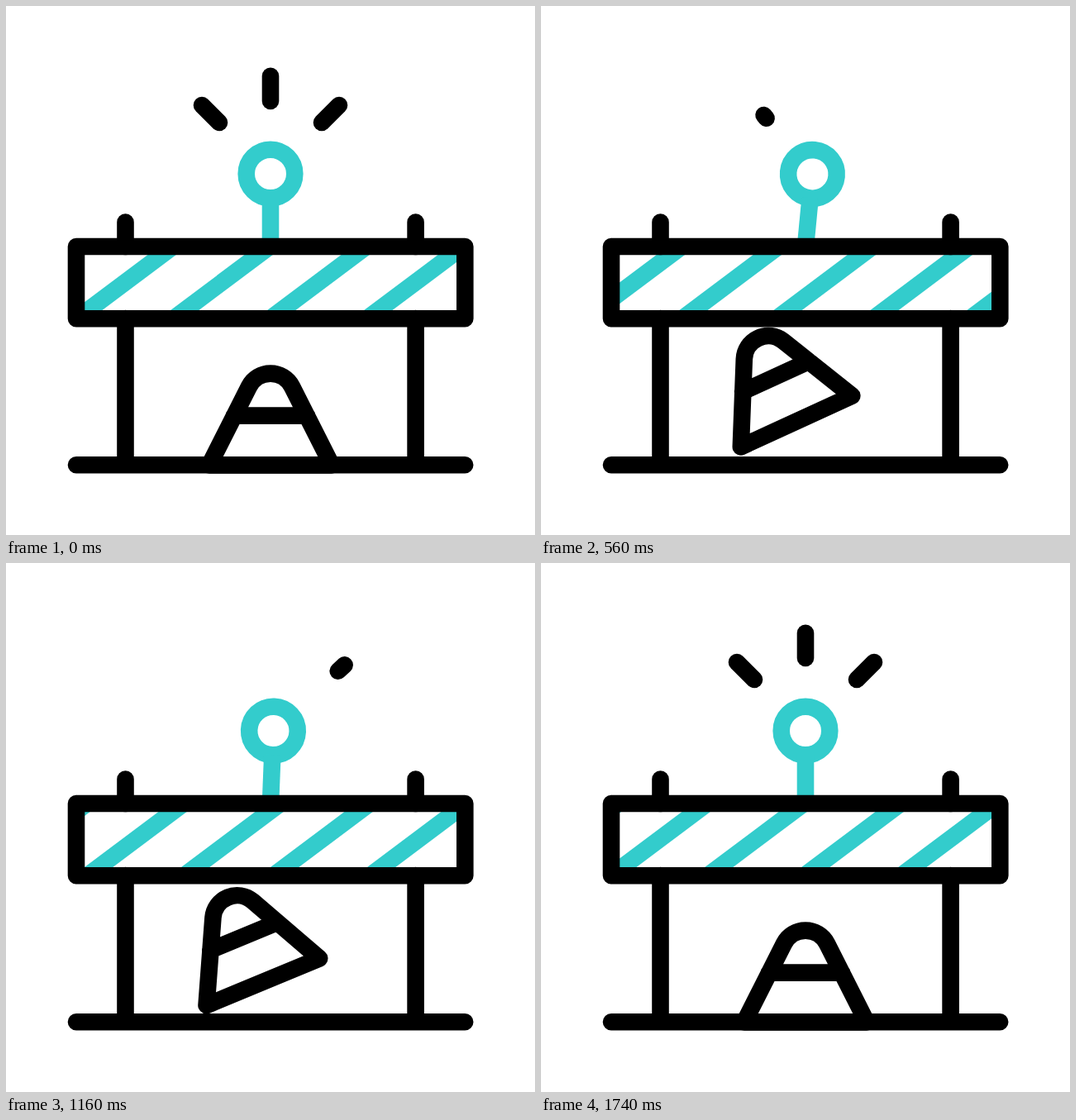
An HTML page for the animation above (2.04 s loop, 640 by 640 pixels).

```html
<!DOCTYPE html>
<html lang="en">
<head>
<meta charset="utf-8">
<title>Road barrier</title>
<style>
  html, body { margin: 0; width: 100%; height: 100%; overflow: hidden; background: #fff; }
  svg { display: block; width: 100vw; height: 100vh; }
  .ink, .teal { fill: none; stroke: #000; stroke-width: 20.6; stroke-linecap: round; stroke-linejoin: round; }
  .teal { stroke: #3cc; stroke-linecap: butt; }
</style>
</head>
<body>
<svg viewBox="0 0 640 640">
  <clipPath id="board"><rect x="85" y="291" width="470" height="87"/></clipPath>
  <g id="lamp">
    <g class="teal">
      <circle cx="320" cy="203" r="29.3"/>
      <path d="M320 232V291"/>
    </g>
    <g id="rays" class="ink"></g>
  </g>
  <g clip-path="url(#board)"><g id="stripes" class="teal"></g></g>
  <g class="ink">
    <rect x="85" y="291" width="470.3" height="87.3"/>
    <path d="M144.5 261.5V291M495.6 261.5V291M144.5 378V555M495.6 378V555M85 555.2H555.2"/>
    <path id="cone" d="M246 555.4L294 460.5A29.2 29.2 0 0 1 346 460.5L394 555.4ZM276 495.6H364"/>
  </g>
</svg>
<script>
  const STEP = 20, LOOP = 2040, LAST = 87;
  const $ = id => document.getElementById(id);

  function addPath(parent, d) {
    const p = document.createElementNS('http://www.w3.org/2000/svg', 'path');
    p.setAttribute('d', d);
    parent.appendChild(p);
    return p;
  }

  const clamp = x => Math.min(1, Math.max(0, x));
  const linear = x => x;
  const smooth = x => x * x * (3 - 2 * x);

  // Symmetric ease: cubic-bezier(a, 0, 1 - a, 1)
  function softEase(x, a) {
    let lo = 0, hi = 1;
    for (let i = 0; i < 24; i++) {
      const u = (lo + hi) / 2, v = 1 - u;
      const at = 3 * a * u * v * v + 3 * (1 - a) * u * u * v + u * u * u;
      if (at < x) lo = u; else hi = u;
    }
    return smooth(lo);
  }

  // keys: [step, value, ease into this key]
  function track(keys, s) {
    for (let i = 1; i < keys.length; i++) {
      const [s0, v0] = keys[i - 1], [s1, v1, ease = smooth] = keys[i];
      if (s <= s1) return v0 + (v1 - v0) * ease((s - s0) / (s1 - s0));
    }
    return keys[keys.length - 1][1];
  }

  const SWING = [[0, 0], [18, -32.3], [33, 18.7], [48, -5.5], [61.5, 3.8], [75, -2.5], [87, 0]];
  const TILT = [[0, 0], [18, 24.6], [36, 24.7], [47, 24, linear], [66, 21.5, linear], [86, 0]];

  // Inner end to outer end, left to right
  const RAYS = [[258, 141, 237, 120], [320, 115, 320, 84.7], [382, 141, 403, 120]];
  const rayPaths = RAYS.map(() => addPath($('rays'), ''));
  const HIDE = [0, 40.5], SHOW = [25.2, 60.5], RAY_TIME = 11, RAY_LAG = 5.5;

  function drawRay(i, s) {
    const local = s - i * RAY_LAG;
    const part = start => smooth(clamp((local - start) / RAY_TIME));
    const round = local >= SHOW[1] ? 2 : local >= SHOW[0] ? 1 : 0;
    const from = round < 2 ? part(HIDE[round]) : 0;
    const to = round ? part(SHOW[round - 1]) : 1;
    const [x0, y0, x1, y1] = RAYS[i];
    const at = k => `${x0 + (x1 - x0) * k} ${y0 + (y1 - y0) * k}`;
    rayPaths[i].setAttribute('d', to - from > 0.004 ? `M${at(from)}L${at(to)}` : '');
  }

  // Three runs of four stripes, with slightly tighter gaps between the runs
  for (let i = -1; i < 12; i++) {
    const x = 206 + 117 * i - (i >= 8 ? 12 : i >= 4 ? 3 : 0);
    addPath($('stripes'), `M${x + 9.4} 281L${x - 133.4} 388`);
  }

  function draw(s) {
    $('lamp').setAttribute('transform', `rotate(${track(SWING, s)} 320 291)`);
    $('cone').setAttribute('transform', `rotate(${-track(TILT, s)} 193.5 554)`);
    $('stripes').setAttribute('transform', `translate(${-925 * softEase(clamp(s / 84), 0.23)} 0)`);
    RAYS.forEach((_, i) => drawRay(i, s));
  }

  const begin = performance.now();
  function tick() {
    const t = (performance.now() - begin) % LOOP;
    draw(Math.min(LAST, Math.floor(t / STEP)));
    requestAnimationFrame(tick);
  }
  tick();
</script>
</body>
</html>
```
